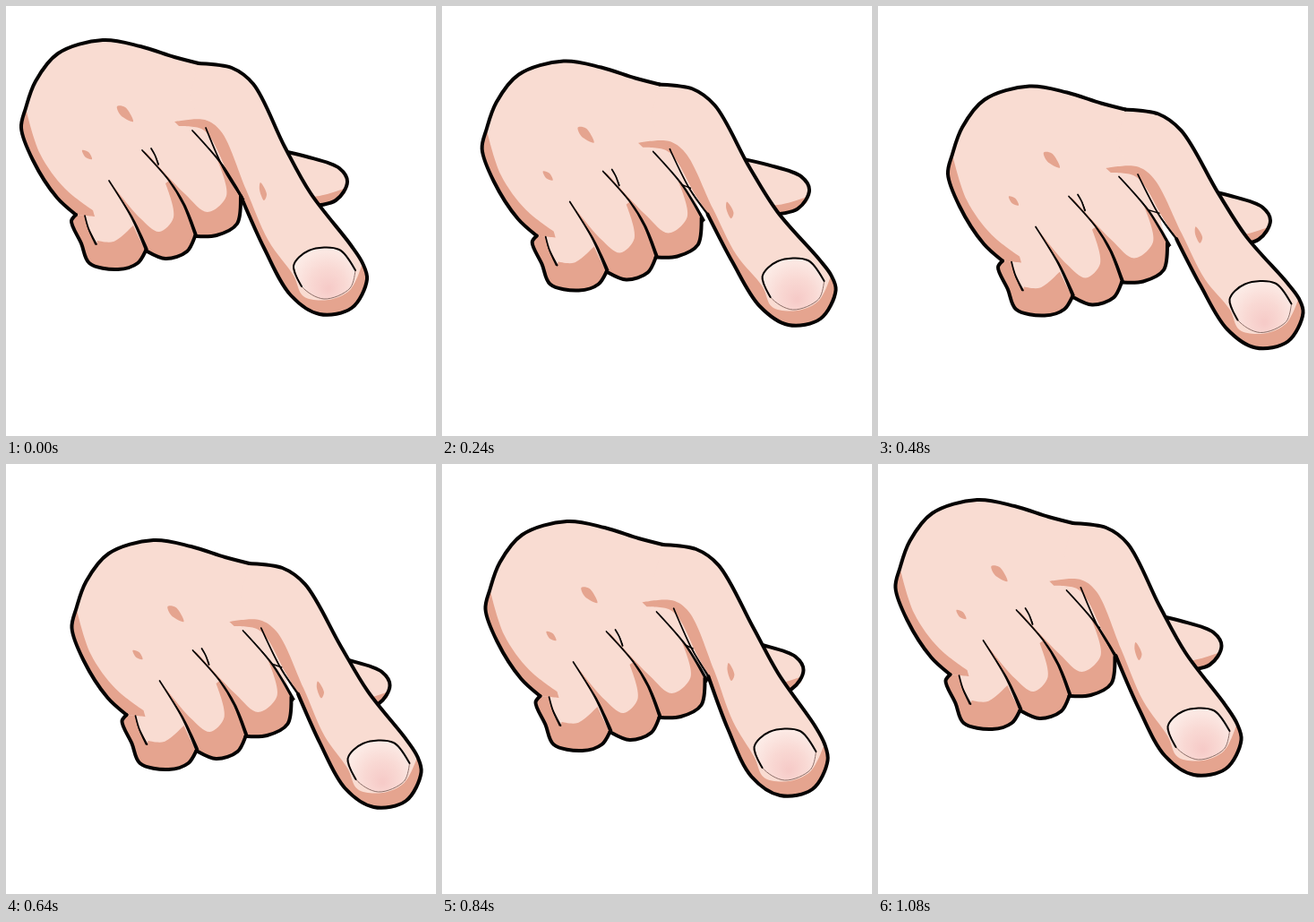
Write an HTML page with a canvas that moves like this. It is 480 px wide and 480 px high and loops after 1.12 s.

```html
<!DOCTYPE html>
<html lang="en">
<head>
<meta charset="utf-8">
<title>Pointing hand</title>
<style>
  html, body { margin: 0; width: 100%; height: 100%; overflow: hidden; background: #fff; }
  canvas { display: block; width: 480px; height: 480px; }
</style>
</head>
<body>
<canvas id="stage" width="480" height="480"></canvas>
<script>
const ctx = document.getElementById('stage').getContext('2d');
const LOOP = 1120, STEP = 40;
const SKIN = '#f9dcd2', SHADE = '#e5a48f', INK = '#050303';

// time, then x/y pairs: palm, mid finger, fingertip, thumb (last three relative to palm)
const KEYS = [
  [0, 0, 0, 0, 0, 0, 0, 0, 0],
  [160, 14, 12, 4, -2, 5.5, -7.5, 1, -9],
  [320, 42, 35.5, 9, -3, 11.5, -14.5, 1, -17],
  [480, 61, 51.5, 10, -3, 10.5, -14, -4, -8],
  [640, 56.5, 47, 7.5, -2, 4, -8, -9, 4],
  [840, 31.5, 26, 4, -1, -4, 0, -9, 8],
  [1080, 2.5, 2, 1, 0, 0, 1, 0, 5]
];

const palmTop = [215,64, 188,57, 150,45, 108,38, 58,53, 33,84, 22,114];
const palmSide = [22,114, 17,136, 30,172, 57,214, 78,233];
const pinky = [78,233, 73,240, 84,265, 93,287, 125,294, 147,287, 156,273];
const ring = [156,273, 178,282, 202,274, 211,257];
const middle = [211,257, 235,256, 258,243, 262,213];
const ringLine = [115,195, 140,236, 156,273];
const middleLine = [152,161, 182,195, 198,222, 211,257];
const indexLine = [208,139, 240,176, 264,217];
const nailLine = [88,234, 92,248, 101,266];

const fingerTop = [215,64, 252,69, 276,87, 311,157, 340,209, 385,267];
const tipEdge = [398,287, 403,305, 386,337, 350,344, 318,323, 288,270, 262,212];
const webEdge = [248,187, 229,148, 218,137, 193,134];
const webLine = [223,136, 243,182, 263,214];
const fingerShade = [188,129, 222,127, 240,140, 268,205, 293,262, 321,301, 332,324,
  360,328, 384,317, 397,290];

const thumb = [300,160, 335,168, 372,181, 381,196, 368,217, 325,225];
const nail = [321,290, 338,273, 372,272, 390,295, 384,315, 355,327, 330,313];

const rev = p => p.map((_, i) => p[p.length - 2 - i + 2 * (i % 2)]);

// Adds a smooth curve through the points to the path
function curve(path, p, closed, join) {
  const n = p.length / 2;
  const at = i => {
    i = closed ? (i + n) % n : Math.max(0, Math.min(n - 1, i));
    return [p[2 * i], p[2 * i + 1]];
  };
  join ? path.lineTo(p[0], p[1]) : path.moveTo(p[0], p[1]);
  for (let i = 0; i < (closed ? n : n - 1); i++) {
    const [a, b, c, d] = [at(i - 1), at(i), at(i + 1), at(i + 2)];
    // Shorter handles on uneven spacing keep the curve from overshooting
    const len = (q, r) => Math.sqrt(Math.hypot(r[0] - q[0], r[1] - q[1])) || 1;
    const l0 = len(a, b), l1 = len(b, c), l2 = len(c, d);
    const k0 = l1 / (l0 + l1) / 3, k1 = l1 / (l1 + l2) / 3;
    const tan = (j, q, r, s, u, v) => (r[j] - q[j]) * u / v + (s[j] - r[j]) * v / u;
    const h0 = j => b[j] + k0 * l1 * tan(j, a, b, c, l1, l0) / l1;
    const h1 = j => c[j] - k1 * l1 * tan(j, b, c, d, l2, l1) / l2 * (l2 / l1);
    path.bezierCurveTo(h0(0), h0(1), h1(0), h1(1), c[0], c[1]);
  }
  if (closed) path.closePath();
}

function fill(color, ...parts) {
  const path = new Path2D();
  parts.forEach((p, i) => curve(path, p, false, i > 0));
  path.closePath();
  ctx.fillStyle = color;
  ctx.fill(path);
}

function blob(color, p) {
  const path = new Path2D();
  curve(path, p, true);
  ctx.fillStyle = color;
  ctx.fill(path);
}

function line(p, width, color = INK) {
  const path = new Path2D();
  curve(path, p);
  ctx.lineWidth = width;
  ctx.strokeStyle = color;
  ctx.stroke(path);
}

// A line that thickens toward its last point
function crease(p, w) {
  const n = p.length / 2;
  const back = p.map((v, i) => v + w * Math.floor(i / 2) / (n - 1) * (i % 2 ? -0.5 : 1));
  fill(INK, p, rev(back));
  line(p, 1.7);
}

// Smooth periodic interpolation between the keys
function pose(t) {
  const n = KEYS.length;
  const key = i => {
    const k = KEYS[(i + n) % n], turn = Math.floor(i / n) * LOOP;
    return [k[0] + turn, ...k.slice(1)];
  };
  let i = n - 1;
  while (KEYS[i][0] > t) i--;
  const [a, b, c, d] = [key(i - 1), key(i), key(i + 1), key(i + 2)];
  const h = c[0] - b[0], u = (t - b[0]) / h, v = 1 - u;
  return b.slice(1).map((y, k) => {
    const j = k + 1;
    const m0 = (c[j] - a[j]) / (c[0] - a[0]) * h;
    const m1 = (d[j] - b[j]) / (d[0] - b[0]) * h;
    return y * (1 + 2 * u) * v * v + m0 * u * v * v + c[j] * u * u * (3 - 2 * u) - m1 * u * u * v;
  });
}

function draw(t) {
  const [px, py, mx, my, tx, ty, hx, hy] = pose(t);

  // Bends finger points: still at the knuckle, full tip offset at the end
  const bend = p => p.map((v, i) => {
    const y = p[i | 1], odd = i % 2;
    const s = Math.max(0, Math.min(1, (y - 75) / 225));
    const m = s * (1 - s) / 0.2424, e = s * (s - 0.587) / 0.413;
    return v + m * (odd ? my : mx) + e * (odd ? ty : tx);
  });

  ctx.setTransform(1, 0, 0, 1, 0, 0);
  ctx.fillStyle = '#fff';
  ctx.fillRect(0, 0, 480, 480);
  ctx.lineCap = ctx.lineJoin = 'round';
  ctx.translate(px, py);

  ctx.save();
  ctx.translate(hx, hy);
  fill(SKIN, thumb);
  fill(SHADE, [320,214, 350,212, 380,203], [378,210, 368,217, 325,225]);
  line(thumb, 4);
  ctx.restore();

  fill(SKIN, palmTop, palmSide, pinky, ring, middle, [255,190, 255,120]);
  fill(SHADE, [22,114, 38,165, 66,204, 97,228], [99,235, 88,234], rev(palmSide));
  fill(SHADE, nailLine, [102,262, 120,263, 142,245], [148,258, 156,273], rev(pinky));
  fill(SHADE, [116,196, 150,237, 171,252, 187,236, 178,198], middleLine.slice(2),
    rev(ring), rev(ringLine));
  fill(SHADE, [157,164, 200,210, 225,230, 246,212, 236,172], indexLine.slice(2),
    rev(middle), rev(middleLine));
  blob(SHADE, [124,112, 133,113, 142,129, 128,122]);
  blob(SHADE, [85,161, 92,163, 96,171, 89,169]);

  const outline = bend([...fingerTop, ...tipEdge]);
  fill(SKIN, outline, bend(webEdge.slice(0, 6)), [205,100]);
  fill(SHADE, bend(fingerShade), bend([...tipEdge, ...webEdge]));
  blob(SHADE, bend([284,197, 291,210, 288,217, 283,205]));

  [[...palmTop, ...palmSide.slice(2)], pinky, ring, middle].forEach(p => line(p, 4));
  line(outline, 4);
  crease(nailLine, -1.5);
  crease(ringLine, 3);
  crease(middleLine, 3);
  crease([162,159, 166,166, 170,177], 1);
  crease(indexLine, 2.5);
  crease(bend(webLine), 1.5);
  line([240,176, ...bend([244,181])], 1.5);

  ctx.translate(tx, ty);
  const glow = ctx.createRadialGradient(360, 316, 2, 358, 308, 38);
  glow.addColorStop(0, '#f6cbc8');
  glow.addColorStop(0.5, '#f9d9d4');
  glow.addColorStop(1, '#fcebe6');
  blob(glow, nail);
  line([...nail.slice(6), ...nail.slice(0, 2)], 1, '#8d6f69');
  line([...nail.slice(12), ...nail.slice(0, 8)], 2);
}

const start = performance.now();
function frame() {
  const t = (performance.now() - start) % LOOP;
  draw(Math.floor(t / STEP) * STEP);
  requestAnimationFrame(frame);
}
draw(0);
requestAnimationFrame(frame);
</script>
</body>
</html>
```
